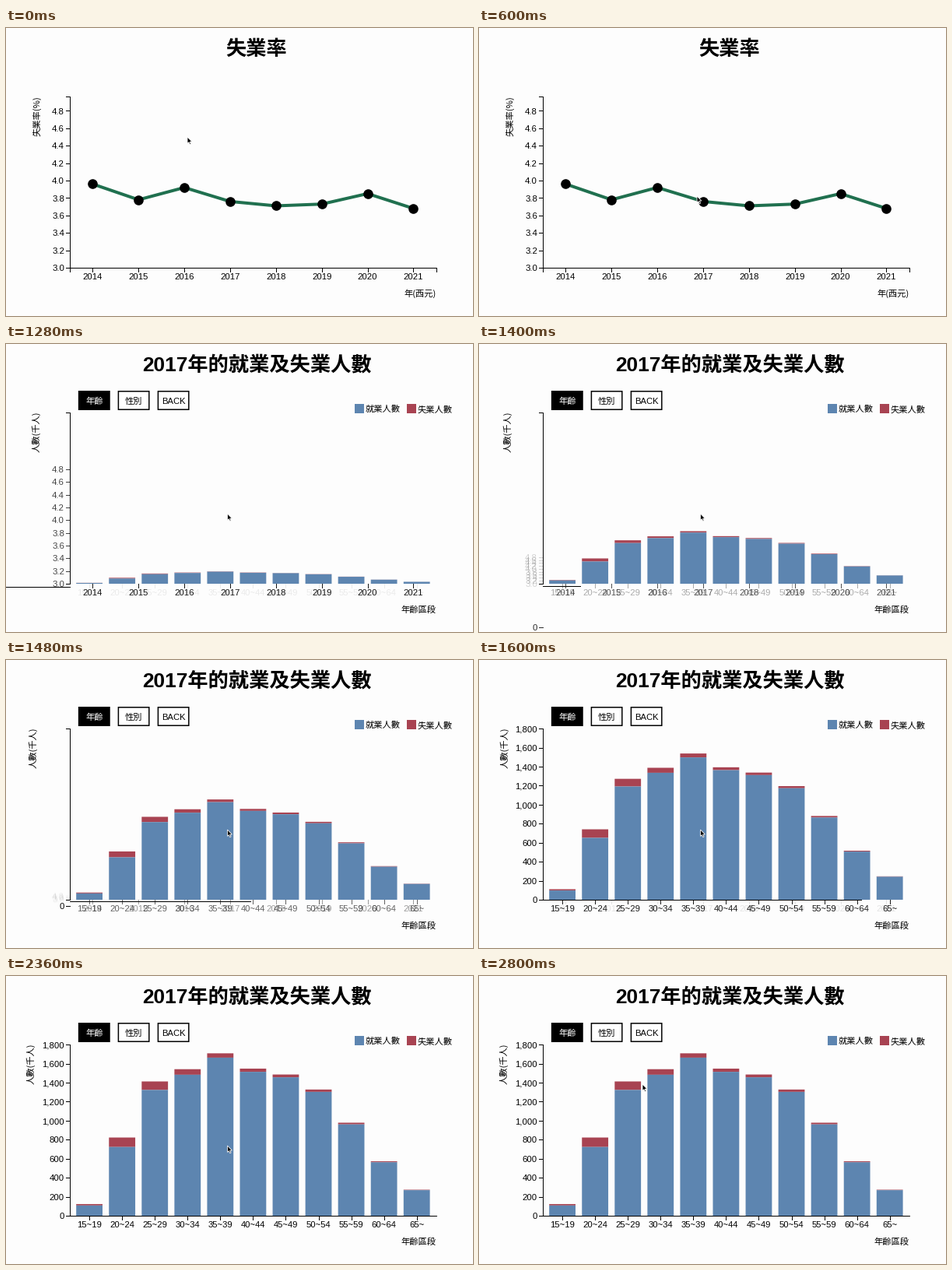
Write a matplotlib script that moves like this. It is 600 px wide and 370 px high and loops after 2.84 s.

```python
import numpy as np
import matplotlib.pyplot as plt
from matplotlib.animation import FuncAnimation
from matplotlib.patches import Rectangle, Polygon

W, H, DPI = 600, 370, 100
STEP, LOOP = 40, 2840
PT = 72 / DPI

BG, BLUE, RED, GREEN = "#fdfdfd", "#5d85b0", "#a84352", "#20704f"
LATIN, CJK = "Liberation Sans", "Noto Sans CJK JP"

LEFT, RIGHT, TOP, BASE = 81.6, 553, 88, 308
SWITCH = 1080          # a click on a point swaps the charts
Y_MOVE = (1080, 490)   # start, span
X_MOVE = (1086, 726)

# chart data: percent per year, thousands of people per age group
RATES = [3.96, 3.78, 3.92, 3.76, 3.71, 3.73, 3.85, 3.68]
PEOPLE = [123, 823, 1413, 1542, 1709, 1548, 1486, 1328, 979, 573, 274]
RATE_PX = 112
COUNT_PX = 24.42 / 200

# the cursor eases between these stops: time, x, y
STOPS = [(0, 233, 140), (180, 123, 200), (420, 477, 214), (600, 280, 216),
         (720, 284.5, 218), (2480, 284.5, 218), (2800, 210, 139)]
ARROW = np.array([(0, 0), (0, 8.4), (1.9, 6.7), (3.2, 9.6), (4.6, 9),
                  (3.3, 6.2), (5.9, 6)])

fig = plt.figure(figsize=(W / DPI, H / DPI), dpi=DPI, facecolor=BG)
ax = fig.add_axes([0, 0, 1, 1])


def ease(t, start, span):
    """Cubic in-out progress."""
    u = np.clip((t - start) / span, 0, 1)
    return 4 * u ** 3 if u < 0.5 else 1 - 4 * (1 - u) ** 3


def mix(a, b, p):
    return a + (b - a) * p


def jobless_share(i):
    """Highest for the young, levelling off with age."""
    return 0.018 + 0.103 * np.exp(-0.82 * max(i - 1, 0))


def year_x(i):
    return 111.4 + 58.86 * i


def age_x(i):
    return 107.1 + 42.06 * i


def rate_y(rate):
    return BASE - (rate - 3) * RATE_PX


def count_y(n):
    return BASE - n * COUNT_PX


def line(xs, ys, color="black", width=1, **kw):
    ax.plot(xs, ys, color=color, lw=width * PT, **kw)


def box(x, y, w, h, fill, edge="none", width=0):
    ax.add_patch(Rectangle((x, y), w, h, fc=fill, ec=edge, lw=width * PT,
                           snap=False))


def label(x, y, s, size=11.2, font=CJK, ha="center", color="black", **kw):
    """Text whose glyphs are centred vertically on y."""
    drop = 0.36 if font == LATIN else 0.38
    ax.text(x, y + drop * size, s, fontsize=size * PT, family=font, ha=ha,
            va="baseline", color=color, **kw)


def title(s):
    label(322, 24.5, s, 26.2, [LATIN, CJK], weight="bold")


def side_label(x, s):
    ax.text(x + 4.2, 113, s, fontsize=11.3 * PT, family=CJK, rotation=90,
            rotation_mode="anchor", ha="center", va="baseline")


def button(x, s, font=CJK, on=False):
    fill, ink = ("black", "white") if on else ("white", "black")
    box(x, 60.8, 39.4, 23.4, fill, "black", 1.5)
    label(x + 20, 73, s, color=ink, font=font)


def x_tick(x, s, alpha):
    line([x, x], [BASE, BASE + 5], alpha=alpha)
    label(x, 319, s, 11.2, LATIN, alpha=alpha)


def y_tick(y, s, alpha):
    if 50 < y < H:
        line([LEFT - 5, LEFT], [y, y], alpha=alpha)
        label(75, y, s, 11.4, LATIN, "right", alpha=alpha)


def x_axis(p):
    """Labels fade from years to age groups."""
    if p < 1:
        for i in range(len(RATES)):
            x_tick(year_x(i), str(2014 + i), 1 - p)
    if p > 0:
        for i in range(len(PEOPLE)):
            low = 15 + 5 * i
            x_tick(age_x(i), f"{low}~{low + 4}" if low < 65 else "65~", p)


def y_axis(p):
    """Ticks slide and fade from the rate scale to the count scale."""
    line([LEFT - 5, LEFT, LEFT, LEFT - 5], [TOP, TOP, BASE, BASE])
    if p < 1:
        for rate in np.arange(3, 4.9, 0.2):
            y_tick(mix(rate_y(rate), count_y(rate), p), f"{rate:.1f}", 1 - p)
    if p > 0:
        for n in range(0, 1801, 200):
            y_tick(mix(rate_y(n), count_y(n), p), f"{n:,}", p)


def rate_chart():
    title("失業率")
    side_label(39, "失業率(%)")
    label(553, 341, "年(西元)", ha="right")
    y_axis(0)
    line([LEFT, LEFT, RIGHT, RIGHT], [BASE + 5, BASE, BASE, BASE + 5])
    x_axis(0)
    xs = [year_x(i) for i in range(len(RATES))]
    ys = [rate_y(r) for r in RATES]
    line(xs, ys, GREEN, 4, solid_joinstyle="round")
    line(xs, ys, "black", 0, marker="o", ms=12.6 * PT, mew=0)


def people_chart(t):
    px, py = ease(t, *X_MOVE), ease(t, *Y_MOVE)
    title("2017年的就業及失業人數")
    side_label(mix(39, 31.5, px), "人數(千人)")
    label(553, 341, "年齡區段", ha="right")

    button(93.6, "年齡", on=True)
    button(144.4, "性別")
    button(195.4, "BACK", LATIN)

    for x, color, name in ((448, BLUE, "就業人數"), (515, RED, "失業人數")):
        box(x, 77, 12, 12, color)
        label(x + 14, 83, name, ha="left")

    for i, n in enumerate(PEOPLE):
        x, h = age_x(i) - 16.9, n * COUNT_PX * px
        red = h * jobless_share(i)
        box(x, BASE - h, 33.8, red, RED)
        box(x, BASE - h + red, 33.8, h - red, BLUE)

    y_axis(py)
    y = BASE + 4.5 * (1 - px)
    line([LEFT, LEFT + mix(-154, RIGHT - LEFT, px)], [y, y])
    x_axis(px)


def cursor(t):
    for (t0, *a), (t1, *b) in zip(STOPS, STOPS[1:]):
        if t <= t1:
            break
    u = (t - t0) / (t1 - t0)
    tip = mix(np.array(a), np.array(b), u * u * (3 - 2 * u))
    ax.add_patch(Polygon(ARROW + tip, fc="black", ec="white", lw=0.8 * PT,
                         zorder=9))


def draw(i):
    t = i * STEP
    ax.cla()
    ax.set(xlim=(0, W), ylim=(H, 0))
    ax.axis("off")
    if t < SWITCH:
        rate_chart()
    else:
        people_chart(t)
    line([0, W], [369.5, 369.5], "#b4b4b4")
    cursor(t)
    return []


anim = FuncAnimation(fig, draw, frames=LOOP // STEP, interval=STEP,
                     init_func=lambda: [], repeat=True, repeat_delay=0)
plt.show()
```
